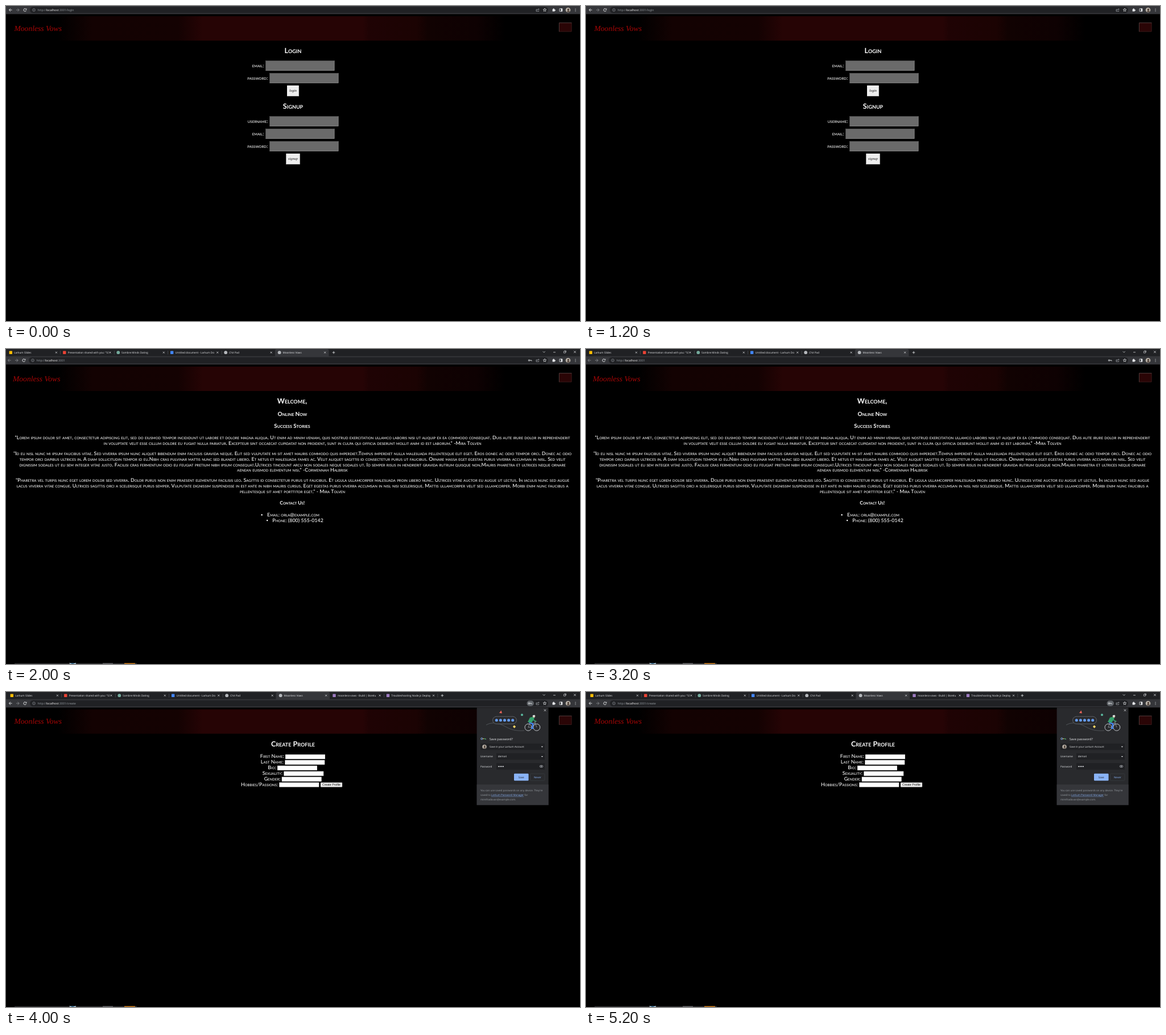
An HTML page with a canvas that plays this animation: 1009x555 px, repeating every 6 s.

```html
<!DOCTYPE html>
<html lang="en">
<head>
<meta charset="utf-8">
<title>Moonless Vows</title>
<style>
  html, body { margin: 0; width: 100%; height: 100%; overflow: hidden; background: #000; }
  canvas, svg { position: absolute; left: 0; top: 0; width: 1009px; height: 555px; }
  text { white-space: pre; text-rendering: geometricPrecision; }
  .ui { font-family: "Open Sans", sans-serif; font-size: 4.65px; fill: #e8eaed; }
  .page { font-family: Lato, sans-serif; font-size: 8.8px; font-weight: 500; font-variant: small-caps; letter-spacing: .05px; fill: #fff; }
  .head { font-size: 12.6px; font-weight: bold; letter-spacing: 0; }
  .script { font-family: "Liberation Serif", serif; font-style: italic; }
  .button { font-family: "Liberation Sans", Arial, sans-serif; font-size: 5.25px; fill: #000; }
</style>
</head>
<body>
<canvas id="stage"></canvas>
<svg id="words" viewBox="0 0 1009 555"></svg>
<script>
const W = 1009, H = 555, SCENE_MS = 2000;
const canvas = document.getElementById('stage');
const words = document.getElementById('words');
const ctx = canvas.getContext('2d');
const dpr = window.devicePixelRatio || 1;
canvas.width = W * dpr;
canvas.height = H * dpr;
ctx.scale(dpr, dpr);

const BAR = '#35363a', DARK = '#202124', LIGHT = '#e8eaed', DIM = '#84878b', BLUE = '#8ab4f8';

function svgNode(tag, attrs, content) {
  const node = document.createElementNS('http://www.w3.org/2000/svg', tag);
  for (const key in attrs) node.setAttribute(key, attrs[key]);
  if (content) node.textContent = content;
  return node;
}

function text(x, y, content, cls, style = '', anchor = 'start') {
  const node = svgNode('text', { x, y, class: cls, style, 'text-anchor': anchor });
  if (Array.isArray(content)) {
    for (const [part, partStyle] of content) node.append(svgNode('tspan', { style: partStyle }, part));
  } else {
    node.textContent = content;
  }
  words.append(node);
}

const middle = (x, y, content, cls, style) => text(x, y, content, cls, style, 'middle');

function rect(x, y, w, h, fill) {
  ctx.fillStyle = fill;
  ctx.fillRect(x, y, w, h);
}

function round(x, y, w, h, r, fill, stroke, width = .6) {
  ctx.beginPath();
  ctx.roundRect(x, y, w, h, r);
  if (fill) { ctx.fillStyle = fill; ctx.fill(); }
  if (stroke) { ctx.strokeStyle = stroke; ctx.lineWidth = width; ctx.stroke(); }
}

function dot(x, y, r, fill) {
  ctx.fillStyle = fill;
  ctx.beginPath();
  ctx.arc(x, y, r, 0, 7);
  ctx.fill();
}

function ring(x, y, r, color, width = .8, from = 0, to = 7) {
  ctx.strokeStyle = color;
  ctx.lineWidth = width;
  ctx.beginPath();
  ctx.arc(x, y, r, from, to);
  ctx.stroke();
}

// Points are a flat list: x, y, x, y ...
function trace(pts) {
  ctx.beginPath();
  for (let i = 0; i < pts.length; i += 2) ctx.lineTo(pts[i], pts[i + 1]);
}

function line(pts, color, width = .8) {
  trace(pts);
  ctx.strokeStyle = color;
  ctx.lineWidth = width;
  ctx.stroke();
}

function shape(pts, fill) {
  trace(pts);
  ctx.fillStyle = fill;
  ctx.fill();
}

function cross(x, y, r, color) {
  line([x - r, y - r, x + r, y + r], color, .7);
  line([x + r, y - r, x - r, y + r], color, .7);
}

function arrow(x, y, dir, color) {
  line([x - 2.6 * dir, y, x + 2.6 * dir, y], color, .9);
  line([x, y - 2.6, x + 2.6 * dir, y, x, y + 2.6], color, .9);
}

function keyIcon(x, y, color) {
  ring(x - 1.5, y, 1.2, color, .9);
  line([x, y, x + 3, y, x + 3, y + 1.3], color, .9);
}

function avatar(x, y, r) {
  dot(x, y, r, '#b9b2a8');
  dot(x + r * .1, y - r * .2, r * .4, '#4a3c34');
  ctx.fillStyle = '#4a3c34';
  ctx.beginPath();
  ctx.arc(x + r * .1, y + r * .8, r * .55, Math.PI, 0);
  ctx.fill();
}

function star(x, y) {
  const pts = [];
  for (let i = 0; i <= 10; i++) {
    const a = i * Math.PI / 5 - Math.PI / 2, r = i % 2 ? 1.3 : 3;
    pts.push(x + r * Math.cos(a), y + r * Math.sin(a));
  }
  line(pts, LIGHT, .7);
}

function toolbar(cy, dx, path, canGoBack, keyMode) {
  rect(0, cy - 7.3, W, 14.6, BAR);
  round(40 + dx, cy - 5.6, 913 - dx, 11.2, 5.6, DARK);
  arrow(6 + dx, cy, -1, canGoBack ? LIGHT : DIM);
  arrow(18.6 + dx, cy, 1, DIM);
  ring(31.3 + dx, cy, 2.4, LIGHT, .9, .3, 5.4);
  shape([32 + dx, cy - .5, 34.3 + dx, cy - .5, 34.3 + dx, cy - 2.9], LIGHT);
  ring(47 + dx, cy, 2.4, '#9aa0a6', .6);
  line([47 + dx, cy - .4, 47 + dx, cy + 1.4], '#9aa0a6', .6);
  rect(46.7 + dx, cy - 1.4, .6, .6, '#9aa0a6');
  text(53.6 + dx, cy + 1.9, [
    ['http://', 'fill:#9aa0a6'], ['localhost', 'fill:#fff'], [':3001' + path, 'fill:#9aa0a6']
  ], 'ui', 'font-size:5.2px');

  if (keyMode === 'open') round(915.5, cy - 4.7, 12.5, 9.4, 4.7, '#5f6368');
  if (keyMode) keyIcon(921, cy, LIGHT);
  line([933.5, cy - 1, 932, cy - 1, 932, cy + 2.4, 936.5, cy + 2.4, 936.5, cy + 1], '#bdc1c6', .6);
  line([933.5, cy + 1, 934.2, cy - 1, 937, cy - 1.3], '#bdc1c6', .6);
  line([935.8, cy - 2.6, 937.2, cy - 1.3, 935.8, cy], '#bdc1c6', .6);
  star(947, cy);
  rect(960.6, cy - 1.5, 4, 4, LIGHT);
  dot(962.6, cy - 1.8, 1, LIGHT);
  dot(965, cy + .4, 1, LIGHT);
  round(973, cy - 2.4, 4.8, 4.8, .4, null, LIGHT, .8);
  rect(975.6, cy - 2.4, 2.4, 4.8, LIGHT);
  avatar(988, cy, 4.3);
  for (const d of [-2, 0, 2]) dot(1001, cy + d, .6, LIGHT);
}

const TABS = [
  ['Larkum Slides', '#fbbc04'],
  ['Presentation shared with you: "Sl', '#ea4335'],
  ['Sombre Minds Dating', '#74aa9c', true],
  ['Untitled document - Larkum Do', '#4285f4'],
  ['Chit Pad', '#b4b7bb', true],
  ['Moonless Vows', '#b4b7bb', true],
  ['moonless-vows - Build | Borelu', '#9e7cc1'],
  ['Troubleshooting Node.js Deploy', '#9e7cc1']
];
const ACTIVE = 5, PITCH = 94.45;

function tabStrip(count, dx) {
  rect(0, 0, W, 13, DARK);
  round(473 + dx * .75, .3, 94.5, 14, [3, 3, 0, 0], BAR);
  for (let i = 0; i < count; i++) {
    const x = dx + i * PITCH, [title, color, isRound] = TABS[i];
    if (isRound) dot(x + 8.4, 6.2, 2.9, color);
    else round(x + 5.6, 3.5, 5.4, 5.4, .6, color);
    text(x + 14.2, 8, title, 'ui');
    cross(x + 88.4, 6.2, 1.5, LIGHT);
    if (i !== ACTIVE && i !== ACTIVE - 1) rect(x + 95.5, 3, .5, 6.5, '#5f6368');
  }
  const plus = dx + count * PITCH + 9.3;
  line([plus - 2.3, 6.2, plus + 2.3, 6.2], LIGHT);
  line([plus, 3.9, plus, 8.5], LIGHT);
  line([943.7, 4.2, 945.7, 6.2, 947.7, 4.2], LIGHT, .7);
  line([962, 5.7, 966, 5.7], LIGHT, .7);
  round(980.4, 4.1, 3, 3, 0, null, LIGHT, .6);
  line([981.4, 3.1, 984.4, 3.1, 984.4, 6.1], LIGHT, .6);
  cross(1000, 5.2, 1.9, LIGHT);
}

function banner(y, titleX) {
  const g = ctx.createLinearGradient(0, 0, W, 0);
  const stops = [
    [.09, 0], [.15, 19], [.3, 20], [.343, 38], [.622, 38], [.632, 31],
    [.715, 27], [.735, 17], [.82, 14], [.87, 0]
  ];
  for (const [at, r] of stops) g.addColorStop(at, `rgb(${r},${r / 8 | 0},${r / 7 | 0})`);
  rect(0, y, W, 43, g);
  text(titleX, y + 25.5, 'Moonless Vows', 'script', 'font-size:13.6px;fill:#a80606');
  rect(972, y + 11.3, 22.4, 16, '#2a0506');
  line([972.4, y + 27, 994, y + 27, 994, y + 11.7], '#3a2020');
  line([972.4, y + 27.3, 972.4, y + 11.7, 994.4, y + 11.7], '#5c4c4c');
}

function taskbar() {
  rect(15, 553.6, 215, 1.4, '#2e2e30');
  rect(112, 553.3, 11, 1.7, '#3f7396');
  line([111.5, 553.6, 115, 555], '#dfe6ea', 1);
  line([123, 553.6, 119, 555], '#dfe6ea', 1);
  rect(170, 553.4, 18, 1.6, '#626266');
  rect(208, 553.4, 19, 1.6, '#c4781c');
}

function greyField(x, y, label) {
  text(x - 2.8, y + 12.2, label, 'page', '', 'end');
  rect(x, y, 121.4, 18, '#6a6a6a');
  line([x + .5, y + 18, x + .5, y + .5, x + 121.4, y + .5], '#494949', 1);
  line([x + .5, y + 17.6, x + 121, y + 17.6, x + 121, y + .5], '#858585');
}

function whiteButton(x, y, w, label) {
  rect(x, y, w, 19, '#efefef');
  line([x, y + 18.6, x + w - .4, y + 18.6, x + w - .4, y], '#b5b5b5');
  middle(x + w / 2, y + 11.3, label, 'script', 'font-size:6.3px;fill:#111');
}

function loginPage() {
  toolbar(7, 2, '/login', true);
  banner(18, 14.5);
  middle(504.4, 83, 'Login', 'page head');
  greyField(456, 96, 'email:');
  greyField(463, 118, 'password:');
  whiteButton(494, 140, 21, 'login');
  middle(504.5, 181, 'Signup', 'page head');
  greyField(463, 194, 'username:');
  greyField(456, 216, 'email:');
  greyField(463, 238, 'password:');
  whiteButton(492.3, 260, 24.4, 'signup');
}

function paragraph(baseline, lines) {
  lines.forEach((content, i) => middle(503.6, baseline + i * 9.85, content, 'page'));
}

function homePage() {
  tabStrip(6, 0);
  toolbar(20, 0, '', false, 'saved');
  banner(31, 12);
  middle(503, 96, 'Welcome,', 'page head');
  middle(503.4, 118.3, 'Online Now', 'page head', 'font-size:10px');
  middle(503, 139.2, 'Success Stories', 'page head', 'font-size:9.8px');
  paragraph(159, [
    '"Lorem ipsum dolor sit amet, consectetur adipiscing elit, sed do eiusmod tempor incididunt ut labore et dolore magna aliqua. Ut enim ad minim veniam, quis nostrud exercitation ullamco laboris nisi ut aliquip ex ea commodo consequat. Duis aute irure dolor in reprehenderit',
    'in voluptate velit esse cillum dolore eu fugiat nulla pariatur. Excepteur sint occaecat cupidatat non proident, sunt in culpa qui officia deserunt mollit anim id est laborum." -Mira Tolven'
  ]);
  paragraph(186.8, [
    '"Id eu nisl nunc mi ipsum faucibus vitae. Sed viverra ipsum nunc aliquet bibendum enim facilisis gravida neque. Elit sed vulputate mi sit amet mauris commodo quis imperdiet.Tempus imperdiet nulla malesuada pellentesque elit eget. Eros donec ac odio tempor orci. Donec ac odio',
    'tempor orci dapibus ultrices in. A diam sollicitudin tempor id eu.Nibh cras pulvinar mattis nunc sed blandit libero. Et netus et malesuada fames ac. Velit aliquet sagittis id consectetur purus ut faucibus. Ornare massa eget egestas purus viverra accumsan in nisl. Sed velit',
    'dignissim sodales ut eu sem integer vitae justo. Facilisi cras fermentum odio eu feugiat pretium nibh ipsum consequat.Ultrices tincidunt arcu non sodales neque sodales ut. Id semper risus in hendrerit gravida rutrum quisque non.Mauris pharetra et ultrices neque ornare',
    'aenean euismod elementum nisi." -Corwennah Halbrisk'
  ]);
  paragraph(234.3, [
    '"Pharetra vel turpis nunc eget lorem dolor sed viverra. Dolor purus non enim praesent elementum facilisis leo. Sagittis id consectetur purus ut faucibus. Et ligula ullamcorper malesuada proin libero nunc. Ultrices vitae auctor eu augue ut lectus. In iaculis nunc sed augue',
    'lacus viverra vitae congue. Ultrices sagittis orci a scelerisque purus semper. Vulputate dignissim suspendisse in est ante in nibh mauris cursus. Eget egestas purus viverra accumsan in nisl nisi scelerisque. Mattis ullamcorper velit sed ullamcorper. Morbi enim nunc faucibus a',
    'pellentesque sit amet porttitor eget." - Mira Tolven'
  ]);
  middle(503.3, 274.3, 'Contact Us!', 'page head', 'font-size:8.5px');
  dot(449.7, 292.3, 1.2, '#fff');
  text(459, 294.8, 'Email: orla@example.com', 'page');
  dot(459.2, 302, 1.2, '#fff');
  text(468.3, 304.6, 'Phone: (800) 555-0142', 'page');
  taskbar();
}

function whiteField(x, y, label) {
  text(x - 2.2, y + 6.4, label, 'page', '', 'end');
  rect(x, y, 70, 8.2, '#c4c4c4');
  rect(x + .5, y + .5, 69, 7.2, '#fff');
}

function cyclist() {
  line([844, 58, 850, 55.5, 857, 54.5], '#6b6f74', .6);
  ctx.beginPath();
  ctx.moveTo(857, 54.5);
  ctx.bezierCurveTo(880, 56, 880, 70, 911, 68);
  ctx.strokeStyle = '#6b6f74';
  ctx.lineWidth = .6;
  ctx.stroke();
  round(855.5, 43.2, 42, 13, 6.5, '#292a2d', '#6b6f74', .8);
  for (let i = 0; i < 5; i++) dot(862.3 + i * 7.1, 49.7, 2.5, '#669df6');
  shape([867, 37, 870.5, 32.6, 872, 37.4], '#ee675c');
  dot(907, 40.3, 2, '#5bb9a0');
  shape([891, 61, 893.4, 58.4, 896.2, 61, 893.6, 63.8], '#fdd663');

  for (const x of [918, 932.8]) ring(x, 62.2, 6, '#c4c7cc', 1);
  line([918, 62.2, 921, 55, 930, 55, 925, 62.2, 918, 62.2], '#9aa0a6', .8);
  line([932.8, 62.2, 929.5, 52.5, 932.5, 52], '#9aa0a6', .8);
  line([919.5, 53.5, 926.5, 56.5, 924.5, 64, 927.5, 64], '#4285f4', 2.2);
  shape([917, 53, 921, 45, 927, 43.5, 929, 46, 924, 54], '#34a06b');
  line([926, 46.5, 928.5, 50.5, 932, 51.5], '#34a06b', 1.5);
  dot(928, 43.3, 2, '#d7c1b0');
  shape([925.5, 43, 926.2, 41, 929.2, 40.6, 930.6, 42.6], '#e8eaed');
}

function caret(x, y) {
  shape([x - 1.7, y - .8, x + 1.7, y - .8, x, y + 1.1], LIGHT);
}

function passwordDialog() {
  rect(827.6, 27.6, 126, 171.6, '#292a2d');
  rect(827.6, 163, 126, 36.2, BAR);
  cross(947.5, 32.2, 1.8, LIGHT);
  cyclist();

  ring(836.3, 82.3, 1.5, BLUE, 1);
  line([838, 82.3, 840, 82.3], '#fdd663', 1);
  line([840, 82.3, 843.2, 82.3, 843.2, 84], '#5bb974', 1);
  text(849.7, 84.5, 'Save password?', 'ui', 'font-size:5.6px');

  rect(834, 90.8, 113, 11.4, DARK);
  avatar(841, 96.4, 3.7);
  text(850, 98.2, 'Save in your Larkum Account', 'ui', 'font-size:4.5px');
  caret(942.4, 96.5);

  text(834, 115.2, 'Username', 'ui', 'font-size:4.5px');
  rect(862, 107.9, 85, 11.4, DARK);
  text(864.7, 115.4, 'demo4', 'ui');
  caret(942.4, 113.7);

  text(834, 132.6, 'Password', 'ui', 'font-size:4.5px');
  rect(862, 125.3, 85, 11.4, DARK);
  for (let i = 0; i < 4; i++) dot(866 + i * 2.7, 131.2, .95, LIGHT);
  ctx.beginPath();
  ctx.ellipse(941, 131, 2.9, 1.8, 0, 0, 7);
  ctx.strokeStyle = '#bdc1c6';
  ctx.lineWidth = .7;
  ctx.stroke();
  dot(941, 131, .9, '#bdc1c6');

  round(893, 143.7, 25.6, 12.6, 1.4, BLUE);
  middle(905.7, 151.6, 'Save', 'ui', 'fill:#202124');
  round(921.5, 144, 25.4, 12, 1.4, null, '#3c4043');
  middle(934.3, 151.6, 'Never', 'ui', `fill:${BLUE}`);

  const note = 'font-size:4.5px;fill:#9aa0a6';
  text(834, 175, 'You can use saved passwords on any device. They\'re', 'ui', note);
  text(834, 182.9, [
    ['saved to ', ''], ['Larkum Password Manager', `fill:${BLUE};text-decoration:underline`], [' for', '']
  ], 'ui', note);
  text(834, 190.6, 'mirelhadovan@example.com.', 'ui', note);
}

function createPage() {
  tabStrip(8, 2);
  toolbar(20, 2, '/create', true, 'open');
  banner(30.5, 14.5);
  middle(504.4, 95.8, 'Create Profile', 'page head');
  const fields = [
    ['First Name:', 491], ['Last Name:', 490.3], ['Bio:', 477], ['Sexuality:', 488.3],
    ['Gender:', 484.7], ['Hobbies/Passions:', 480.3]
  ];
  fields.forEach(([label, x], i) => whiteField(x, 110 + i * 9.87, label));
  round(553, 159.6, 38, 7.8, .8, '#efefef', '#767676', .5);
  middle(572, 165.4, 'Create Profile', 'button');
  passwordDialog();
  taskbar();
}

const scenes = [loginPage, homePage, createPage];
const start = performance.now();
let shown = -1;

function tick() {
  const elapsed = Math.max(0, performance.now() - start);
  const index = Math.floor(elapsed / SCENE_MS) % scenes.length;
  if (index !== shown) {
    shown = index;
    words.replaceChildren();
    rect(0, 0, W, H, '#000');
    scenes[index]();
  }
  requestAnimationFrame(tick);
}
tick();
</script>
</body>
</html>
```
